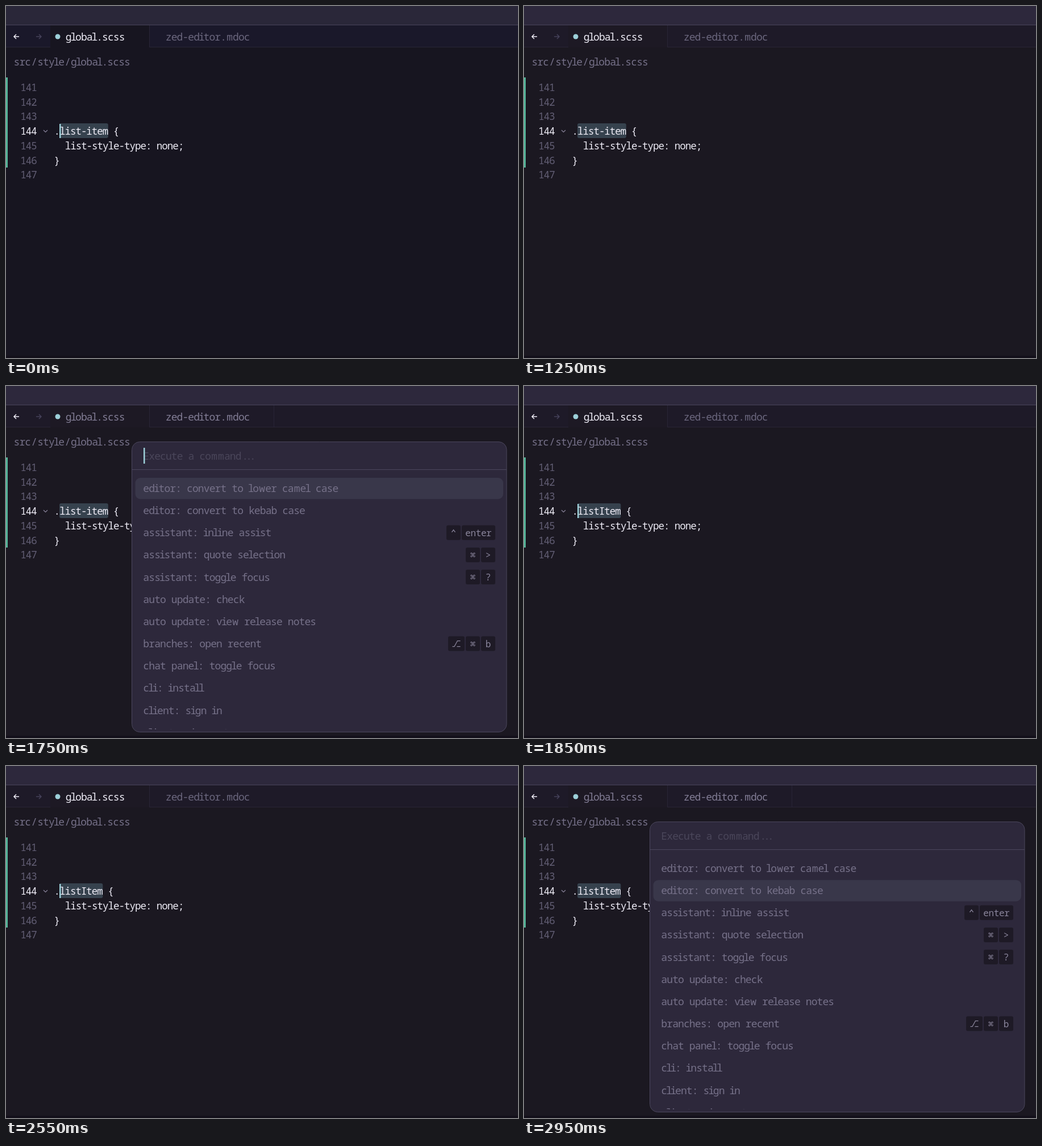
An HTML page with a canvas that plays this animation: 901 by 621 pixels, repeating every 3000 ms.

```html
<!DOCTYPE html>
<html lang="en">
<head>
<meta charset="utf-8">
<title>Command palette</title>
<style>
html, body { margin: 0; width: 100%; height: 100%; overflow: hidden; background: #1b1821; }
canvas { display: block; }
</style>
</head>
<body>
<canvas id="stage" width="901" height="621"></canvas>
<script>
const ctx = document.getElementById('stage').getContext('2d');
const LOOP = 3000, PITCH = 9.48, ROW = 39.15;
const FONT = '"Noto Sans Mono", "DejaVu Sans Mono", monospace';
const COOL = { title: '#2a2739', tabs: '#1a182a', active: '#171520', bg: '#171520' };
const WARM = { title: '#2d283c', tabs: '#1e1a28', active: '#1d1924', bg: '#1b1821' };
const WHITE = '#eeecf6', MUTED = '#767189', DIM = '#625e74', CYAN = '#9ccfd8', LINE = '#48445a';

const COMMANDS = [
  ['editor: convert to lower camel case'],
  ['editor: convert to kebab case'],
  ['assistant: inline assist', '^', 'enter'],
  ['assistant: quote selection', '⌘', '>'],
  ['assistant: toggle focus', '⌘', '?'],
  ['auto update: check'],
  ['auto update: view release notes'],
  ['branches: open recent', '⌥', '⌘', 'b'],
  ['chat panel: toggle focus'],
  ['cli: install'],
  ['client: sign in'],
  ['client: sign out']
];

const between = (t, a, b) => t >= a && t < b;

function rect(x, y, w, h, color, r = 0) {
  ctx.fillStyle = color;
  ctx.beginPath();
  ctx.roundRect(x, y, w, h, r);
  ctx.fill();
}

function path(color, width, ...lines) {
  ctx.strokeStyle = color;
  ctx.lineWidth = width;
  ctx.beginPath();
  for (const points of lines)
    points.forEach(([x, y], i) => i ? ctx.lineTo(x, y) : ctx.moveTo(x, y));
  ctx.stroke();
}

// Places each glyph in the middle of its cell.
function glyphs(str, x, y, color, size, advance) {
  ctx.font = `${size}px ${FONT}`;
  ctx.fillStyle = color;
  ctx.textAlign = 'center';
  for (const c of str) {
    const w = advance(c);
    ctx.fillText(c, x + w / 2, y);
    x += w;
  }
}

const code = (str, x, y, color, pitch = PITCH) => glyphs(str, x, y, color, 17.5, () => pitch);

// Interface text: narrow i and l, wide m, w and slash.
const label = (str, x, y, color) => glyphs(str, x, y, color, 18,
  c => 9.9 + ('il'.includes(c) ? -2.5 : 'mw/'.includes(c) ? 2 : 0));

function drawChrome(theme, open) {
  rect(0, 0, 901, 621, theme.bg);
  rect(0, 0, 901, 33, theme.title);
  rect(0, 34, 901, 38, theme.tabs);
  rect(78, 34, 174, 39, theme.active);
  rect(0, 33, 901, 1, LINE);
  rect(0, 72, 78, 1, '#292536');
  rect(252, 72, 649, 1, '#292536');
  rect(252, 34, 1, 39, '#292536');
  if (open) rect(471, 34, 1, 39, '#292536');
  rect(0, 617, 901, 4, '#13101a');

  path(WHITE, 1.5, [[23, 54], [14.5, 54]], [[18, 50], [14, 54], [18, 58]]);
  path('#45415a', 1.5, [[53, 54], [61.5, 54]], [[58, 50], [62, 54], [58, 58]]);
  rect(86.5, 49.5, 9, 9, CYAN, 4.5);
  label('global.scss', 105.2, 60.5, open ? '#827d95' : WHITE);
  label('zed-editor.mdoc', 281.2, 60.5, open ? '#827d95' : '#6b677e');
  label('src/style/global.scss', 14, 105, MUTED);
}

function drawCode(name, caret) {
  rect(0, 126, 3, 159, '#55b699');
  for (let i = 0; i < 7; i++)
    code(String(141 + i), 25.8, 150 + i * 25.7, i === 3 ? WHITE : DIM);
  path('#8a859c', 1.2, [[66, 219], [69.5, 222.5], [73, 219]]);
  rect(94, 207, name.length * PITCH + 0.5, 26, '#36424e', 3);
  code('.' + name + ' {', 85, 227, WHITE);
  code('list-style-type: none;', 104.2, 252.7, WHITE);
  code('}', 85, 278.5, WHITE);
  if (caret) rect(94, 208, 2.5, 25, CYAN);
}

function drawKeys(keys, y) {
  let right = 861;
  for (const key of [...keys].reverse()) {
    const w = key === 'enter' ? 59 : key === '⌥' ? 29 : 25;
    const x = right - w, mid = x + w / 2;
    rect(x, y - 13, w, 26, '#1e1a26', 3);
    if (key === '⌥') {
      path('#8a859c', 1.3, [[mid - 7, y + 5], [mid - 3.5, y + 5], [mid + 2, y - 5], [mid + 7, y - 5]],
        [[mid + 1, y + 5], [mid + 7, y + 5]]);
    } else if (key === '^') {
      path('#8a859c', 1.3, [[mid - 3, y - 1], [mid, y - 5], [mid + 3, y - 1]]);
    } else if (key === '⌘') {
      ctx.font = '11px "DejaVu Sans", sans-serif';
      ctx.fillStyle = '#8a859c';
      ctx.textAlign = 'center';
      ctx.fillText(key, mid, y + 4);
    } else {
      glyphs(key, mid - key.length * 4.6, y + 6, '#8a859c', 16, () => 9.2);
    }
    right = x - 2;
  }
}

function drawPalette(selected, caret) {
  rect(222, 98.5, 659, 512, '#2d283b', 14);
  ctx.strokeStyle = '#4b475d';
  ctx.lineWidth = 1;
  ctx.beginPath();
  ctx.roundRect(221.5, 98.5, 659.5, 512, 14);
  ctx.stroke();
  rect(222, 147, 659, 1, '#4b475d');
  label('Execute a command', 241.8, 130, '#4a465a');
  code('...', 417.5, 130, '#4a465a', 6.7);
  if (caret) rect(242, 109, 2.5, 28, CYAN);

  ctx.save();
  ctx.beginPath();
  ctx.rect(222, 148, 659, 457.5);
  ctx.clip();
  rect(227.5, 162 + selected * ROW, 647.5, 37.5, '#39374a', 9);
  COMMANDS.forEach(([text, ...keys], i) => {
    const y = 180.5 + i * ROW;
    label(text, 241.8, y + 6.5, MUTED);
    drawKeys(keys, y);
  });
  ctx.restore();
}

function draw(t) {
  const second = t >= 2600;
  const open = second || between(t, 1300, 1850);
  drawChrome(t < 1150 ? COOL : WARM, open);
  drawCode(t < 1850 ? 'list-item' : 'listItem',
    t < 150 || between(t, 1850, 2250) || between(t, 2550, 2600));
  if (open) drawPalette(t >= 2750 ? 1 : 0, t < 2900);
}

const start = performance.now();
function tick() {
  draw((performance.now() - start) % LOOP);
  requestAnimationFrame(tick);
}
tick();
</script>
</body>
</html>
```
